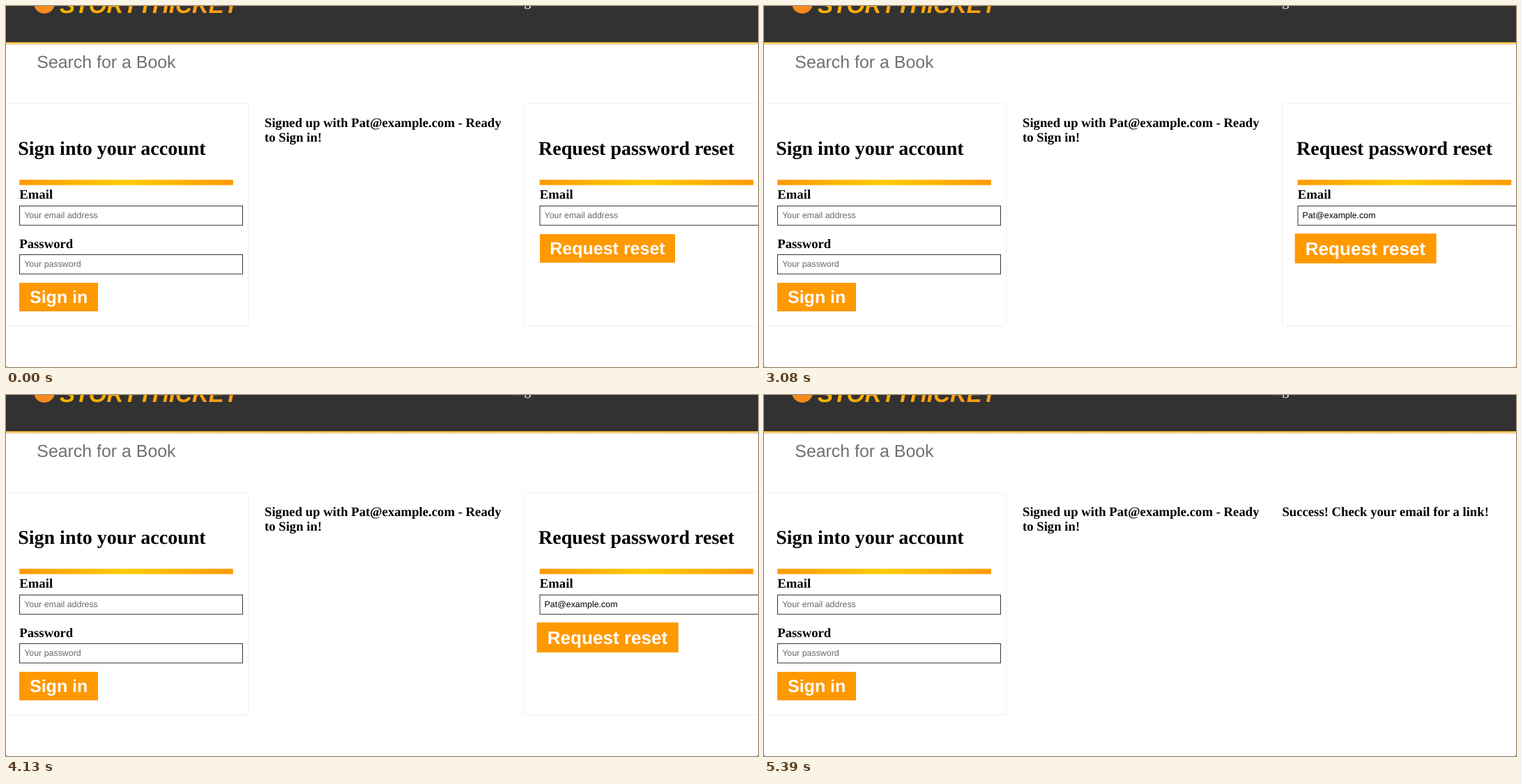
Write an HTML page that moves like this. It is 1079x519 px and loops after 8 s.

```html
<!DOCTYPE html>
<html lang="en">
<head>
<meta charset="utf-8">
<title>Account page</title>
<style>
  html, body { margin: 0; width: 100%; height: 100%; overflow: hidden; background: #777; }
  svg { display: block; width: 1079px; height: 519px; background: #fff; border-radius: 0 0 3px 3px; }

  text { white-space: pre; text-rendering: geometricPrecision; }
  .serif { font: bold 18.72px "Liberation Serif", Times, serif; }
  .title { font-size: 28px; }
  .nav { font: 20px "Liberation Serif", Times, serif; fill: #fff; }
  .brand { font: italic bold 33.1px "Liberation Sans", Arial, sans-serif; fill: url(#logo); }
  .search { font: 24.9px "Liberation Sans", Arial, sans-serif; fill: #707070; }
  .input { font: 12.4px "Liberation Sans", Arial, sans-serif; }
  .hint { fill: #696969; }
  .label { font: bold 25px "Liberation Sans", Arial, sans-serif; fill: #fff; }
  .menu { font: 10px Inter, sans-serif; fill: #222; }
  .box { fill: #fff; stroke: #333; }
  .panel { fill: none; stroke: #f0f0f0; }
  .button { fill: #f90; }
  .card { fill: #fff; filter: drop-shadow(0 1px 1.5px rgba(0, 0, 0, .4)); }

  #reset { transform-box: fill-box; transform-origin: center; }

  .timed { animation: 8s step-end infinite; }
  #form { animation-name: form; }
  #empty { animation-name: empty; }
  #filled { animation-name: filled; }
  #caret { animation-name: caret; }
  #popup { animation-name: popup; }
  #success { animation-name: success; }

  @keyframes form    { 0% { visibility: visible } 67.375%, 100% { visibility: hidden } }
  @keyframes empty   { 0% { visibility: visible } 28.875%, 100% { visibility: hidden } }
  @keyframes filled  { 0% { visibility: hidden } 28.875% { visibility: visible } 67.375%, 100% { visibility: hidden } }
  @keyframes caret   { 0% { visibility: hidden } 20.125% { visibility: visible } 26.25%, 100% { visibility: hidden } }
  @keyframes popup   { 0% { visibility: hidden } 20.125% { visibility: visible } 28.875%, 100% { visibility: hidden } }
  @keyframes success { 0% { visibility: hidden } 67.375%, 100% { visibility: visible } }
</style>
</head>
<body>
<svg viewBox="0 0 1079 519">
  <defs>
    <linearGradient id="bar">
      <stop offset="0" stop-color="#ff9900"/>
      <stop offset=".5" stop-color="#ffcc00"/>
      <stop offset="1" stop-color="#ff9900"/>
    </linearGradient>
    <linearGradient id="logo">
      <stop offset="0" stop-color="#ffb300"/>
      <stop offset="1" stop-color="#ff9a14"/>
    </linearGradient>
    <linearGradient id="edge" x2="0" y2="1">
      <stop offset="0" stop-color="#efb535"/>
      <stop offset=".35" stop-color="#fdca4c"/>
      <stop offset=".6" stop-color="#d8ccb0" stop-opacity=".7"/>
      <stop offset="1" stop-color="#ddd" stop-opacity="0"/>
    </linearGradient>
    <g id="field">
      <rect x="19.2" y="249.8" width="306.6" height="7.7" fill="url(#bar)"/>
      <text class="serif" x="19.3" y="277.2">Email</text>
      <rect class="box" x="19.5" y="287.5" width="320" height="27.7"/>
    </g>
  </defs>

  <rect width="1079" height="52.5" fill="#323232"/>
  <rect y="52" width="1079" height="5" fill="url(#edge)"/>
  <circle cx="55" cy="-4" r="15" fill="#f58a1f"/>
  <text class="brand" x="77" y="10">STORYTHICKET</text>
  <text class="nav" x="726.5" y="-.5">Sign in</text>
  <text class="search" x="44.3" y="89.3">Search for a Book</text>

  <rect class="panel" x="-10" y="140.5" width="357.5" height="319.5" rx="1"/>
  <text class="serif title" x="17.2" y="214.3">Sign into your account</text>
  <use href="#field"/>
  <text class="input hint" x="26.2" y="305.2">Your email address</text>
  <text class="serif" x="19.3" y="347.5">Password</text>
  <rect class="box" x="19.5" y="357.5" width="320" height="27.7"/>
  <text class="input hint" x="26.2" y="375.4">Your password</text>
  <rect class="button" x="19" y="398" width="113" height="41"/>
  <text class="label" x="34" y="427.4">Sign in</text>

  <text class="serif" x="371" y="174.2">Signed up with Pat@example.com - Ready</text>
  <text class="serif" x="371" y="195.3">to Sign in!</text>

  <g id="form" class="timed">
    <rect class="panel" x="743.5" y="140.5" width="357" height="319.5" rx="1"/>
    <text class="serif title" x="764" y="214.3">Request password reset</text>
    <use href="#field" x="746.5"/>
    <g id="reset">
      <rect class="button" x="766" y="328" width="194" height="41"/>
      <text class="label" x="780.3" y="357.3">Request reset</text>
    </g>
  </g>
  <text id="empty" class="timed input hint" x="772.6" y="305.2">Your email address</text>
  <text id="filled" class="timed input" x="772.6" y="305.2">Pat@example.com</text>
  <rect id="caret" class="timed" x="772.5" y="294" width="1.2" height="14.5"/>

  <g id="popup" class="timed">
    <path class="card" d="M845 322H852.500L858 317L863.500 322H998a3 3 0 0 1 3 3V389a3 3 0 0 1 -3 3H845a3 3 0 0 1 -3 -3V325a3 3 0 0 1 3 -3Z"/>
    <path d="M842 357H1001" stroke="#e4e4e4"/>
    <text class="menu" x="851.5" y="343.6">corin.tavlis@example.com</text>
    <circle cx="857.7" cy="374.5" r="5.5" fill="#4a4a4a"/>
    <text class="menu" x="872.8" y="378.3">Manage...</text>
  </g>

  <text id="success" class="timed serif" x="743.4" y="174.2">Success! Check your email for a link!</text>
</svg>
<script>
  const LOOP = 8000, TICK = 70, HOVER = 2765, HALF = 525;

  // CSS "ease", solved by bisection
  function ease(x) {
    let lo = 0, hi = 1, s = x;
    for (let i = 0; i < 24; i++) {
      s = (lo + hi) / 2;
      if (.75 * s * (1 - s) + s ** 3 < x) lo = s; else hi = s;
    }
    return .3 * s * (1 - s) ** 2 + 3 * s * s * (1 - s) + s ** 3;
  }

  // Alternating pulse, held for one tick at a time
  function scaleAt(t) {
    const p = (t - HOVER) / HALF % 2;
    return 1 + .05 * ease(p < 1 ? p : 2 - p);
  }

  const key = (t, scale) => ({ offset: t / LOOP, transform: `scale(${scale})`, easing: 'step-end' });
  const frames = [key(0, 1)];
  for (let t = 2800; t < 5390; t += TICK) frames.push(key(t, scaleAt(t)));
  frames.push(key(5390, 1), key(LOOP, 1));
  document.getElementById('reset').animate(frames, { duration: LOOP, iterations: Infinity });
</script>
</body>
</html>
```
